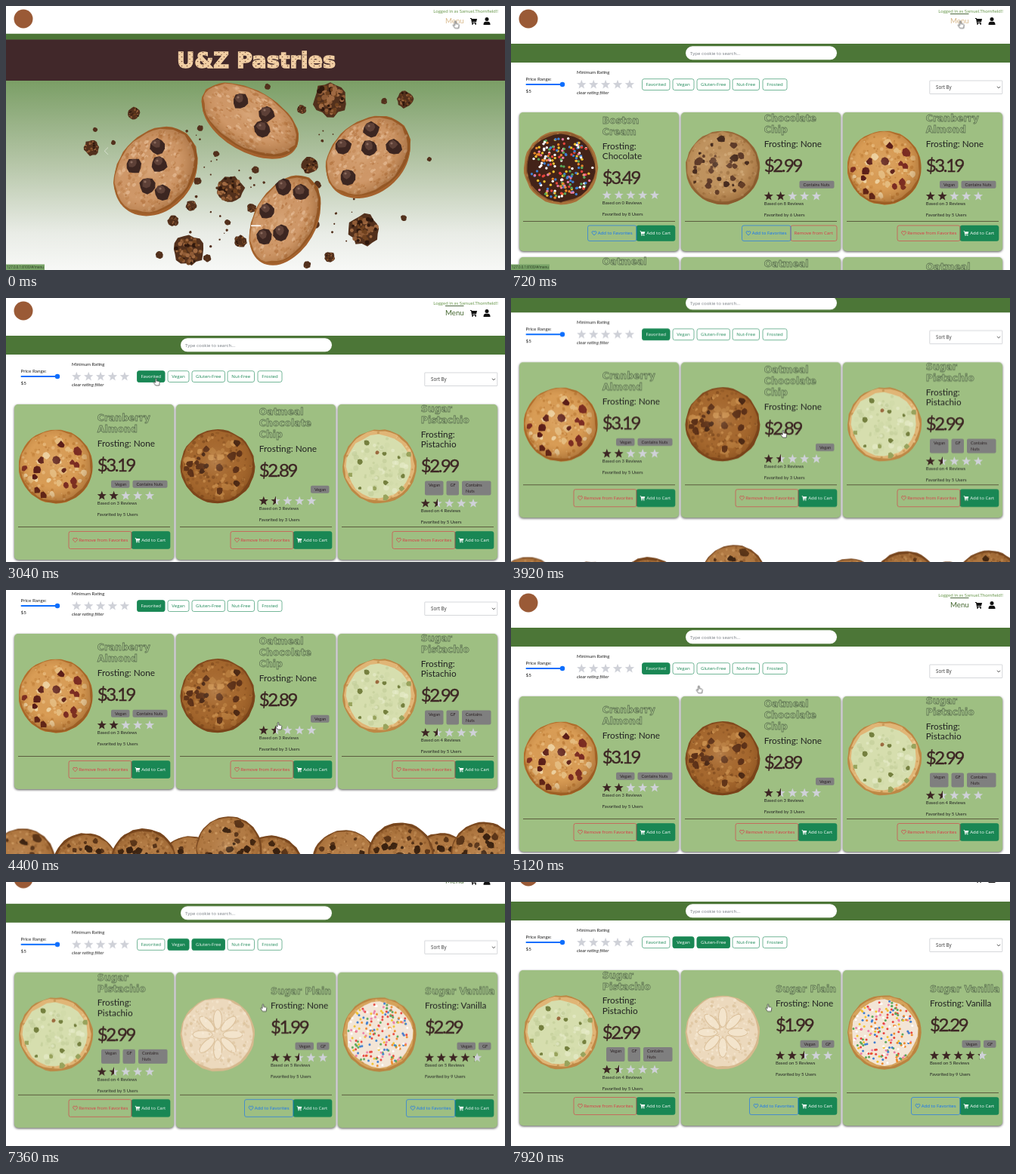
An HTML page that plays this animation: 660 by 350 pixels, repeating every 8000 ms.

```html
<!DOCTYPE html>
<html lang="en">
<head>
<meta charset="utf-8">
<title>Cookie shop</title>
<style>
html, body { margin: 0; width: 100%; height: 100%; overflow: hidden; background: #fff; }
svg { display: block; width: 660px; height: 350px; }
text { font-family: "Open Sans", sans-serif; white-space: pre; }
.soft { font-family: Lato, sans-serif; }
.fat { font-family: "DejaVu Sans", sans-serif; font-weight: bold; }
.end { text-anchor: end; }
.mid { text-anchor: middle; }
.card { filter: drop-shadow(0 1px 1.5px #000a); }

.show { animation: 8s step-end infinite; }
.home { animation-name: home; }
.menu { animation-name: menu; }
.hover { animation-name: hover; }
.rest { animation-name: rest; }
.all { animation-name: all; }
.trio { animation-name: trio; }
.fav { animation-name: fav; }
.vegan { animation-name: vegan; }
.gf { animation-name: gf; }
@keyframes home { 0% { opacity: 1 } 6%, 100% { opacity: 0 } }
@keyframes menu { 0% { opacity: 0 } 6%, 100% { opacity: 1 } }
@keyframes hover { 0% { opacity: 1 } 13%, 100% { opacity: 0 } }
@keyframes rest { 0% { opacity: 0 } 13%, 100% { opacity: 1 } }
@keyframes all { 0% { opacity: 1 } 26% { opacity: 0 } 70% { opacity: 1 } 79%, 100% { opacity: 0 } }
@keyframes trio { 0% { opacity: 0 } 26% { opacity: 1 } 70% { opacity: 0 } 79% { opacity: 1 } 86%, 100% { opacity: 0 } }
@keyframes fav { 0% { opacity: 0 } 26% { opacity: 1 } 70%, 100% { opacity: 0 } }
@keyframes vegan { 0% { opacity: 0 } 79%, 100% { opacity: 1 } }
@keyframes gf { 0% { opacity: 0 } 86%, 100% { opacity: 1 } }

.page { animation: scroll 8s ease-in-out infinite; }
@keyframes scroll {
  0%, 46% { transform: translateY(0) }
  51%, 57% { transform: translateY(-83px) }
  61.5%, 89% { transform: translateY(0) }
  92% { transform: translateY(-21.2px); animation-timing-function: ease-out }
  96%, 100% { transform: translateY(-24px) }
}
.hand { animation: move 8s ease-in-out infinite; }
@keyframes move {
  0%, 12% { transform: translate(595.5px, 24.5px) }
  19%, 25% { transform: translate(184px, 111px) }
  28%, 43% { transform: translate(199.5px, 111px) }
  46.5%, 61% { transform: translate(361px, 180px) }
  66%, 71% { transform: translate(195px, 108px) }
  75%, 79.5% { transform: translate(236.5px, 109px) }
  83%, 86.5% { transform: translate(268px, 107px) }
  90%, 100% { transform: translate(341px, 166.5px) }
}
</style>
</head>
<body>
<svg viewBox="0 0 660 350" xmlns="http://www.w3.org/2000/svg"></svg>
<script>
const GREEN = '#198754', RED = '#dc3545', BLUE = '#0d6efd', BROWN = '#3d2624', BAND = '#4c7637';

let seed = 11;
const rnd = () => (seed = seed * 16807 % 2147483647) / 2147483647;
const range = (a, b) => a + rnd() * (b - a);
const pick = list => list[Math.floor(rnd() * list.length)];
const times = (n, f) => Array.from({ length: n }, (_, i) => f(i)).join('');
const num = v => +v.toFixed(2);

const group = (body, more = '') => `<g ${more}>${body}</g>`;
const at = (x, y, body) => group(body, `transform="translate(${x} ${y})"`);
const show = (name, body) => group(body, `class="show ${name}"`);
const circle = (x, y, r, fill, more = '') =>
  `<circle cx="${num(x)}" cy="${num(y)}" r="${num(r)}" fill="${fill}" ${more}/>`;
const rect = (x, y, w, h, r, fill, more = '') =>
  `<rect x="${x}" y="${y}" width="${w}" height="${h}" rx="${r}" fill="${fill}" ${more}/>`;
const path = (d, fill, more = '') => `<path d="${d}" fill="${fill}" ${more}/>`;
// y is the visual middle of the line
const text = (x, y, str, size, fill, cls = '', more = '') =>
  `<text x="${x}" y="${num(y + size * .35)}" font-size="${size}" fill="${fill}" class="${cls}" ${more}>${str.replace('&', '&amp;')}</text>`;
const use = (id, x, y, more = '') => `<use href="#${id}" transform="translate(${x} ${y}) ${more}"/>`;

function ring(x, y, n, radius) {
  return Array.from({ length: n }, (_, i) => {
    const a = i / n * 2 * Math.PI - Math.PI / 2, r = radius(i);
    return num(x + r * Math.cos(a)) + ',' + num(y + r * Math.sin(a));
  }).join(' ');
}
const blob = (x, y, r, fill, jag = .15, n = 11) =>
  `<polygon points="${ring(x, y, n, () => r * range(1 - jag, 1 + jag))}" fill="${fill}"/>`;
const star = (x, y, r, fill) =>
  `<polygon points="${ring(x, y, 10, i => i % 2 ? r * .42 : r)}" fill="${fill}"/>`;

function scatter(n, radius, f) {
  return times(n, () => {
    const a = rnd() * 2 * Math.PI, d = radius * Math.sqrt(rnd());
    return f(d * Math.cos(a), d * Math.sin(a));
  });
}

// Cookies, radius 49 around the origin
const specks = (n, radius, lo, hi, colors) =>
  scatter(n, radius, (x, y) => circle(x, y, range(lo, hi), pick(colors), 'opacity=".6"'));
const dough = (edge, base, colors, n = 150) =>
  blob(0, 0, 49, edge, .012, 44) + blob(-.5, -1, 46.5, base, .02, 36) + specks(n, 45.5, .7, 2.4, colors);
const chips = (n, lo, hi, colors) =>
  scatter(n, 42, (x, y) => blob(x, y, range(lo, hi), pick(colors), .25, 8));
const shade = circle(0, 0, 48.5, 'url(#shade)');
const candy = ['#e8443c', '#fff', '#3f7fd0', '#f2c230', '#ee7fa6', '#ef8a2c', '#5aa85a'];
const sprinkles = (n, r) => scatter(n, 42, (x, y) => circle(x, y, r, pick(candy)));

const art = {
  boston: () => dough('#a8713a', '#8d5a2e', ['#c08a4f', '#74451f']) + blob(0, 0, 45, '#432318', .02, 30) + sprinkles(210, 1.7),
  chip: () => dough('#9c7040', '#bf935f', ['#d8b382', '#9a6e40', '#ad8150']) + chips(34, 1.8, 5, ['#442a1f', '#5d3a29']) + shade,
  cran: () => dough('#b9742f', '#d99d56', ['#f0c88d', '#b87530', '#c98a43']) + chips(18, 2.5, 5.5, ['#efd3a2', '#e6bd80']) +
    chips(15, 3, 5.8, ['#571a16', '#7a2a22']) + shade,
  oat: () => dough('#81491e', '#a5682f', ['#d49b59', '#74421b', '#8e5626']) + chips(28, 2, 5, ['#c78d4c', '#b67b3d']) +
    chips(20, 2.5, 5.5, ['#442414', '#5b3018']) + shade,
  pist: () => dough('#bd8845', '#e0b576', ['#f1d39c', '#bd8845']) + blob(-1, 0, 42.5, '#d6deae', .035, 24) +
    specks(80, 39, 1, 4, ['#e8edcb', '#bfcb96', '#ced8a6']) + chips(13, 2, 4.5, ['#75803f', '#98a35c', '#9c6b40']),
  plain: () => dough('#d6b98e', '#ecd9bd', ['#f6e9d4', '#dcc29b']) +
    times(8, i => `<ellipse cy="-20" rx="5.5" ry="13" fill="#f3e4cc" stroke="#dabf99" stroke-width="1" transform="rotate(${i * 45})"/>`) +
    times(8, i => circle(0, -38, 2, '#dec6a1', `transform="rotate(${i * 45 + 22.5})"`)) + specks(60, 44, .6, 1.8, ['#f8eddb', '#dcc4a0']),
  vanilla: () => dough('#bb8440', '#d5a35c', ['#e8c286', '#b37c3a']) + blob(0, 0, 43.5, '#f3e5d6', .03, 26) + sprinkles(200, 1.5),
  disc: () => dough('#a8662f', '#cf9869', ['#e9c29c', '#b0703c', '#dbab80', '#c08350'], 300) + shade,
  foot: () => dough('#7d4c24', '#b27b45', ['#d3a269', '#8a572a', '#a06a37'], 200) + chips(26, 2, 6, ['#38200f', '#553218']) + shade
};

// Icons
const cart = (x, y, k, fill) => group(
  path('M-4.6-4h1.8l.4 1.1H4.6L3.5 1.2H-1.7l.2.9H3.3v.9H-2.3L-3.5-3.1H-4.6z', fill) + circle(-1.4, 3.9, .95, fill) + circle(2.6, 3.9, .95, fill),
  `transform="translate(${x} ${y}) scale(${k})"`);
const heart = (x, y, color) => path(`M${x} ${y + 2.5}c-4-2.6-3.1-5.2-1.5-5.2q1.1 0 1.5 1.1.4-1.1 1.5-1.1c1.6 0 2.5 2.6-1.5 5.2z`,
  'none', `stroke="${color}" stroke-width=".7"`);

// Product cards
const list = {
  boston: { title: ['Boston', 'Cream'], frost: ['Frosting:', 'Chocolate'], price: '$3.49', stars: 0, reviews: 0, favs: 8, tags: [] },
  chip: { title: ['Chocolate', 'Chip'], frost: ['Frosting: None'], price: '$2.99', stars: 2, reviews: 8, favs: 6, tags: ['Contains Nuts'] },
  cran: { title: ['Cranberry', 'Almond'], frost: ['Frosting: None'], price: '$3.19', stars: 2, reviews: 3, favs: 5, tags: ['Vegan', 'Contains Nuts'], fav: 1 },
  oat: { title: ['Oatmeal', 'Chocolate', 'Chip'], frost: ['Frosting: None'], price: '$2.89', stars: 1.5, reviews: 3, favs: 3, tags: ['Vegan'], fav: 1 },
  pist: { title: ['Sugar', 'Pistachio'], frost: ['Frosting:', 'Pistachio'], price: '$2.99', stars: 1.5, reviews: 4, favs: 5, tags: ['Vegan', 'GF', 'Contains Nuts'], fav: 1 },
  plain: { title: ['Sugar Plain'], frost: ['Frosting: None'], price: '$1.99', stars: 2.5, reviews: 5, favs: 5, tags: ['Vegan', 'GF'], indent: 125 },
  vanilla: { title: ['Sugar Vanilla'], frost: ['Frosting: Vanilla'], price: '$2.29', stars: 4.2, reviews: 5, favs: 9, tags: ['Vegan', 'GF'], indent: 115 }
};
const tagWidth = { 'Vegan': 24.5, 'GF': 16.5, 'Contains Nuts': 46 };

function tags(names, y) {
  const wrap = names.length > 2, h = wrap ? 19 : 10;
  let right = 202.5, out = '';
  for (const name of [...names].reverse()) {
    const w = wrap && name.includes(' ') ? 38.5 : tagWidth[name];
    const lines = wrap ? name.split(' ') : [name];
    right -= w;
    out += rect(right, y - h / 2, w, h, 2, '#7f7f7f') +
      lines.map((s, i) => text(right + 5, y + (wrap ? i * 8 - 4 : 0), s, 5.6, '#2a2022', 'soft')).join('');
    right -= 4;
  }
  return out;
}

function rating(x, y, value) {
  return times(5, i => {
    const part = Math.max(0, Math.min(1, value - i));
    const fill = part === 1 ? BROWN : part === 0 ? '#cfd1d8' : part < .4 ? 'url(#bit)' : 'url(#half)';
    return star(x + 6 + i * 15.8, y, 6.4, fill);
  });
}

function button(right, y, w, h, label, color, icon) {
  const x = right - w, solid = color === GREEN, ink = solid ? '#fff' : color, my = y + h / 2;
  const mark = icon === 'heart' ? heart(x + 8.5, my, ink) : icon ? cart(x + 8, my, .72, ink) : '';
  return rect(x, y, w, h, 2.5, solid ? color : 'none', `stroke="${color}" stroke-width=".6"`) + mark +
    text(x + (icon ? 13.3 : 4.5), my, label, 6.05, ink);
}

function card(x, y, name, start, tall, extra = {}) {
  const c = { ...list[name], ...extra }, tx = c.indent || 109.8;
  const line = tall ? 163 : 145, h = tall ? 206 : 184, by = tall ? 168.5 : 150, bh = tall ? 23 : 20.5;
  let cy = start, out = rect(0, 0, 211, h, 5, '#9ebf82', 'class="card"') + use(name, 55, line / 2 + .9);
  c.title.forEach((s, i) => out += text(tx, cy + i * 15, s, 12.4, '#a3c388', 'fat', 'stroke="#5f7453" stroke-width=".8"'));
  cy += (c.title.length - 1) * 15 + 18.5;
  c.frost.forEach((s, i) => out += text(tx, cy + i * 13.7, s, 11.8, '#222', 'soft'));
  cy += (c.frost.length - 1) * 13.7 + 28.7;
  out += text(tx, cy, c.price, 24, BROWN, 'soft', 'letter-spacing="-2.4" stroke="#3d2624" stroke-width=".35"');
  if (c.tags.length) {
    const wrap = c.tags.length > 2;
    out += tags(c.tags, cy + (wrap ? 29 : 25.5));
    cy += wrap ? 49.5 : 41;
  } else cy += 23;
  out += rating(tx, cy, c.stars) +
    text(tx, cy + 9.7, `Based on ${c.reviews} Reviews`, 6, '#222', 'soft') +
    text(tx, cy + 24.7, `Favorited by ${c.favs} Users`, 6, '#222', 'soft') +
    rect(5, line - .9, 201, .9, 0, '#555338') ;
  const cw = c.inCart ? 61 : 51;
  out += c.inCart ? button(206, by, cw, bh, 'Remove from Cart', RED) : button(206, by, cw, bh, 'Add to Cart', GREEN, 'cart');
  out += c.fav ? button(206 - cw, by, 83, bh, 'Remove from Favorites', RED, 'heart')
    : button(206 - cw, by, 64.5, bh, 'Add to Favorites', BLUE, 'heart');
  return at(x, y, out);
}
const COLS = [11, 225, 439];

// Landing page
const crumb = (x, y, r) => blob(x, y, r, '#52301c', .13, 17) +
  times(r > 5 ? Math.round(r * 3) : 1, () => {
    const a = rnd() * 2 * Math.PI, d = r * .85 * Math.sqrt(rnd());
    return circle(x + d * Math.cos(a), y + d * Math.sin(a), range(.06, .16) * r, pick(['#8f5b36', '#2f180d', '#70421f', '#a06a42']));
  });
const lump = (x, y) => blob(x, y, 10.5, '#3c2621', .12, 10) + blob(x - 1.5, y - 3.5, 6, '#5d4037', .2, 8) + circle(x - 3, y - 5, 1.6, '#8a6a5d');

function hero() {
  const discs = [[323, 152, 30, 1.45, .82], [198, 219, -50, 1.3, 1.03], [479, 200, -40, 1.27, .97], [369, 284, -60, 1.3, .85]];
  const lumps = [[310, 126], [345, 143], [339, 163], [169, 212], [203, 210], [187, 238], [200, 186], [207, 247],
    [446, 186], [481, 188], [452, 227], [513, 187], [483, 164], [345, 272], [367, 240], [364, 301], [390, 247], [341, 306]];
  const crumbs = [[429, 124, 22], [296, 243, 18], [242, 324, 20], [474, 297, 20], [402, 211, 11], [113, 188, 10], [528, 124, 11],
    [169, 142, 8], [310, 312, 8], [391, 137, 6], [428, 333, 7], [500, 126, 4], [526, 281, 4], [560, 203, 3], [221, 285, 7],
    [245, 265, 7], [253, 232, 5], [118, 164, 3], [142, 181, 3], [203, 330, 5], [266, 334, 5], [330, 217, 5], [257, 162, 4],
    [278, 196, 4], [325, 268, 6], [293, 287, 4], [410, 290, 5], [412, 237, 5], [398, 343, 5], [346, 107, 4]];
  return rect(0, 0, 660, 350, 0, 'url(#fade)') +
    times(55, () => crumb(range(235, 470), range(150, 320), range(.6, 2.2))) +
    crumbs.map(c => crumb(...c)).join('') +
    discs.map(([x, y, a, sx, sy]) =>
      `<ellipse rx="${sx * 48}" ry="${sy * 48}" fill="#a4612d" transform="translate(${x} ${y + 2}) rotate(${a})"/>` +
      use('disc', x, y - 1, `rotate(${a}) scale(${sx} ${sy * .97})`)).join('') +
    lumps.map(([x, y]) => lump(x, y)).join('') +
    path('M135 187.5l-4.7 4.7 4.7 4.7', 'none', 'stroke="#fff" stroke-width="1" opacity=".5"') +
    rect(324, 290.5, 13, 1.6, 0, '#fff') +
    rect(0, 36.7, 660, 8, 0, BAND) + rect(0, 44.5, 660, 54.5, 0, '#41282a') +
    text(331, 72, 'U&Z Pastries', 28.7, 'url(#dots)', 'fat mid', 'stroke="#f2cfa4" stroke-width="1.6" paint-order="stroke"');
}

// Menu page
const chip = (x, w, label, on) =>
  rect(x, 96.7, w, 14.8, 2.6, on ? GREEN : '#fff', `stroke="${GREEN}" stroke-width=".6"`) +
  text(x + w / 2, 104.2, label, 6.1, on ? '#fff' : GREEN, 'mid');

function filters() {
  return rect(0, 50, 660, 25, 0, BAND) +
    rect(231, 53.3, 200, 18, 9, '#fff') + text(237, 62.6, 'Type cookie to search...', 6.1, '#747a80') +
    text(19.5, 97, 'Price Range:', 6.3, '#222', 'soft') +
    rect(19.5, 103, 50, 2, 1, BLUE) + circle(68, 104, 3.2, BLUE) +
    text(19.5, 112.3, '$5', 6.3, '#222', 'soft') +
    text(87, 87.7, 'Minimum Rating', 6, '#222', 'soft') +
    times(5, i => star(93.3 + i * 15.9, 104.3, 6.5, '#cfd1d8')) +
    text(87, 115, 'clear rating filter', 6.1, '#555', 'soft', 'font-style="italic" font-weight="bold"') +
    chip(173.5, 36.5, 'Favorited') + chip(214, 28, 'Vegan') + chip(246, 43.5, 'Gluten-Free') +
    chip(293, 35.5, 'Nut-Free') + chip(333, 32, 'Frosted') +
    show('fav', chip(173.5, 36.5, 'Favorited', true)) +
    show('vegan', chip(214, 28, 'Vegan', true)) +
    show('gf', chip(246, 43.5, 'Gluten-Free', true)) +
    rect(553.8, 99, 96, 17.5, .5, '#fff', 'stroke="#c4c8cc" stroke-width=".7"') +
    text(562, 108, 'Sort By', 6.2, '#333') +
    path('M643 106.8l2 2 2-2', 'none', 'stroke="#333" stroke-width=".9"');
}

function footer() {
  const pile = [[22, 360], [243, 370], [105, 366], [182, 360], [350, 369], [295, 344], [448, 362], [575, 366], [522, 352], [632, 351]];
  return pile.map(([x, y], i) => use('foot', x, y + 83, `rotate(${i * 70}) scale(.89)`)).join('');
}

function menu() {
  const oats = { title: ['Oatmeal'] };
  return rect(0, 0, 660, 460, 0, '#fff') + filters() +
    show('all',
      card(COLS[0], 141, 'boston', 11, false) + card(COLS[1], 141, 'chip', 8, false, { inCart: 1 }) + card(COLS[2], 141, 'cran', 8, false) +
      COLS.map((x, i) => card(x, 333, 'oat', [6, 9, 13][i], true, oats)).join('')) +
    show('trio',
      card(COLS[0], 141, 'cran', 18, true) + card(COLS[1], 141, 'oat', 10, true) + card(COLS[2], 141, 'pist', 6, true) + footer()) +
    show('gf',
      card(COLS[0], 141, 'pist', 6.5, true) + card(COLS[1], 141, 'plain', 25, true) + card(COLS[2], 141, 'vanilla', 25, true));
}

function header() {
  const link = color => text(581, 19.3, 'Menu', 9.7, color, 'soft');
  return rect(0, 0, 660, 36.7, 0, '#fff') + circle(23, 17, 12.5, '#9a5a36') +
    text(651, 6.5, 'Logged in as Samuel.Thornfield!!', 6.1, '#6c9a50', 'soft end') +
    show('hover', link('#d8b88a')) + show('rest', link('#44672f')) +
    show('menu', rect(581, 10, 24.5, .9, 0, '#3c5a2c')) +
    cart(618.5, 20, 1, '#111') +
    circle(636, 17.6, 2.5, '#111') + path('M631.5 25q0-4.2 3-4.2h3q3 0 3 4.2z', '#111');
}

const stops = pairs => pairs.map(([o, c]) => `<stop offset="${o}" stop-color="${c}"/>`).join('');
const split = (id, p) => `<linearGradient id="${id}">${stops([[p, BROWN], [p, '#cfd1d8']])}</linearGradient>`;
const defs = Object.keys(art).map(id => group(art[id](), `id="${id}"`)).join('') + split('half', .5) + split('bit', .25) +
  `<linearGradient id="fade" x2="0" y2="1">${stops([[.28, '#7a9e65'], [.6, '#b6c6a8'], [.86, '#e9ece6'], [1, '#f7f8f6']])}</linearGradient>` +
  `<radialGradient id="shade" cx=".46" cy=".44" r=".56">${stops([[0, '#ffe3c030'], [.6, '#a0602000'], [1, '#6a381066']])}</radialGradient>` +
  `<pattern id="dots" width="7" height="6" patternUnits="userSpaceOnUse">${rect(0, 0, 7, 6, 0, '#f2cfa4')}${circle(1.5, 1.5, .8, '#7a4f3c')}${circle(5, 4.4, .65, '#7a4f3c')}</pattern>`;

const status = rect(0, 342.5, 51, 7.5, 0, '#79a468') + text(1, 346.3, '127.0.0.1:8100/#/menu', 4.5, '#26361f');
const hand = path('M-1.6 5L-4 1.6q-.6-1.1.5-1.3l1.6 1V-4q.9-1.2 1.7 0V-.9q3.6-.2 4 1.5L3.2 5z', '#fff', 'stroke="#222" stroke-width=".65"');

document.querySelector('svg').innerHTML = `<defs>${defs}</defs>` +
  group(show('home', hero()) + show('menu', menu()) + header(), 'class="page"') +
  show('hover', status) + group(hand, 'class="hand"');
</script>
</body>
</html>
```
